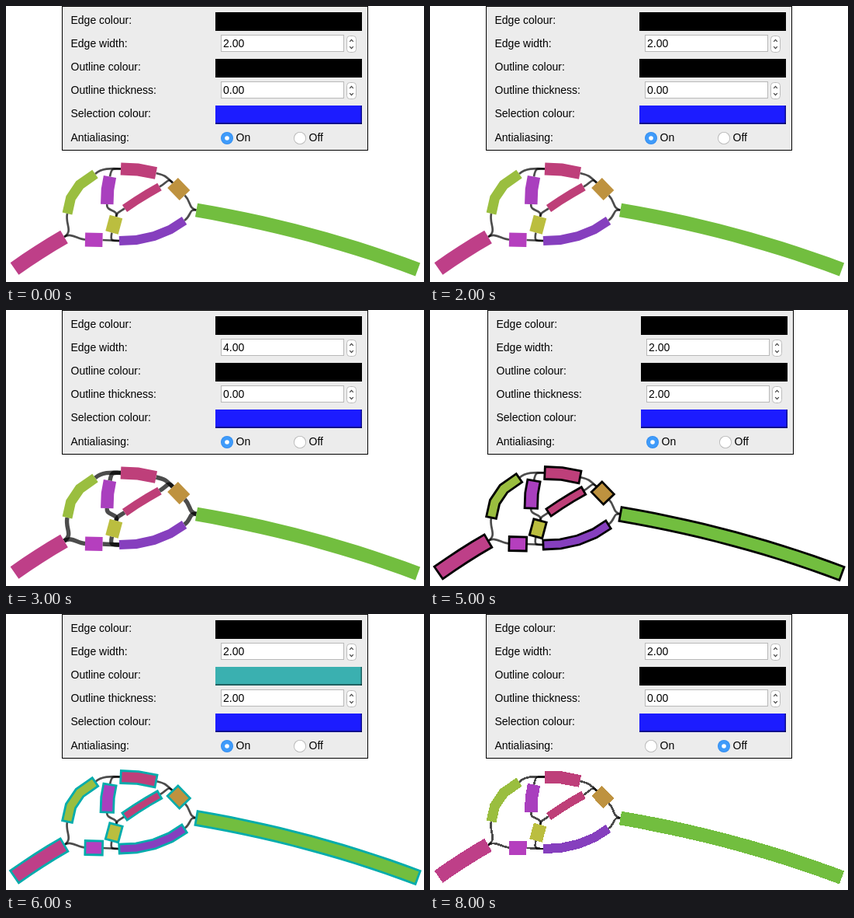
Animation of 539 by 355 pixels, one loop 9 s. Source, as an HTML page with a canvas:

```html
<!DOCTYPE html>
<html lang="en">
<head>
<meta charset="utf-8">
<title>Graph appearance settings</title>
<style>
html, body { margin: 0; width: 100%; height: 100%; overflow: hidden; background: #fff; }
canvas { display: block; width: 539px; height: 355px; }
</style>
</head>
<body>
<canvas id="stage" width="539" height="355"></canvas>
<script>
const W = 539, H = 355, STEP = 1000;
const ctx = document.getElementById('stage').getContext('2d');
const scratch = document.createElement('canvas');
scratch.width = W;
scratch.height = H;
const soft = scratch.getContext('2d', { willReadFrequently: true });

const base = { edge: '#000000', width: 2, outline: '#000000', thick: 0, smooth: true, shift: 0 };
const states = [
  {}, { edge: '#3ab0b0' },
  {}, { width: 4 },
  {}, { thick: 2, shift: 2 }, { thick: 2, outline: '#3ab0b0', line: '#00acac' },
  {}, { smooth: false }
].map(s => ({ ...base, ...s }));

// Points along a quadratic curve
function bend(a, c, b, n) {
  return Array.from({ length: n + 1 }, (_, i) => {
    const t = i / n, u = 1 - t;
    return [0, 1].map(k => u * u * a[k] + 2 * u * t * c[k] + t * t * b[k]);
  });
}

const nodes = [
  { fill: '#be3f88', w: 19, pts: bend([11, 338], [42, 316], [75, 297], 4) },
  { fill: '#9abe3f', w: 13, pts: [[79, 267], [83.5, 247], [95, 230], [115, 216]] },
  { fill: '#be3f7a', w: 16, pts: [[148, 209.5], [170, 210.5], [193.5, 215]] },
  { fill: '#a93fbe', w: 16.5, pts: [[134, 219.5], [131, 236], [130.3, 255]] },
  { fill: '#be3f78', w: 11, pts: bend([153, 260.5], [175, 245], [198, 232.5], 3) },
  { fill: '#be923f', w: 19, pts: [[215, 227.5], [230.5, 243.5]] },
  { fill: '#bbbe3f', w: 17, pts: [[142, 271], [136.5, 291.5]] },
  { fill: '#b53fbe', w: 18, pts: [[102, 300.5], [124.5, 301]] },
  { fill: '#863fbe', w: 12, pts: [[146, 302], [168, 301], [191, 296], [212, 287.5], [230, 276]] },
  { fill: '#72be3f', w: 18, pts: bend([245.5, 262.5], [395, 288], [531, 339], 14) }
];

const edges = [
  'M75 297C87 289 76 281 79 267',
  'M75 297C84 291 92 300 102 300.5',
  'M115 216C124 208 136 209 148 209.5',
  'M134 219.5C136 208 138 209 148 209.5',
  'M193.5 215C206 218 206 219 215 227.5',
  'M198 232.5C208 227 209 220 215 227.5',
  'M130.3 255C129 265 145 261 142 271',
  'M153 260.5C144 266 144 265 142 271',
  'M136.5 291.5C134 303 137 302 146 302',
  'M124.5 301C132 301 139 302 146 302',
  'M230.5 243.5C239 252 235 260 245.5 262.5',
  'M230 276C240 269 235 261 245.5 262.5'
].map(d => new Path2D(d));

// Outline of a thick polyline with flat ends and mitred joints
function ribbon({ pts, w }) {
  const normals = pts.slice(1).map((p, i) => {
    const dx = p[0] - pts[i][0], dy = p[1] - pts[i][1], len = Math.hypot(dx, dy);
    return [-dy / len, dx / len];
  });
  const side = sign => pts.map((p, i) => {
    const a = normals[Math.max(0, i - 1)];
    const b = normals[Math.min(normals.length - 1, i)];
    const k = sign * w / 2 / (1 + a[0] * b[0] + a[1] * b[1]);
    return [p[0] + (a[0] + b[0]) * k, p[1] + (a[1] + b[1]) * k];
  });
  const path = new Path2D();
  [...side(1), ...side(-1).reverse()].forEach(p => path.lineTo(p[0], p[1]));
  path.closePath();
  return path;
}
nodes.forEach(n => { n.path = ribbon(n); });

// Paints one part; without smoothing its coverage is cut to whole pixels
function paint(smooth, alpha, draw) {
  if (smooth) {
    ctx.save();
    ctx.globalAlpha = alpha;
    draw(ctx);
    ctx.restore();
    return;
  }
  soft.clearRect(0, 0, W, H);
  draw(soft);
  const img = soft.getImageData(0, 0, W, H), d = img.data;
  for (let i = 3; i < d.length; i += 4) d[i] = d[i] > 127 ? 255 : 0;
  soft.putImageData(img, 0, 0);
  ctx.globalAlpha = alpha;
  ctx.drawImage(scratch, 0, 0);
  ctx.globalAlpha = 1;
}

function drawGraph(s) {
  for (const path of edges) {
    paint(s.smooth, 0.7, c => {
      c.strokeStyle = s.edge;
      c.lineWidth = s.width * 1.35;
      c.stroke(path);
    });
  }
  for (const n of nodes) {
    paint(s.smooth, 1, c => {
      c.fillStyle = n.fill;
      c.fill(n.path);
      if (!s.thick) return;
      c.strokeStyle = s.line || s.outline;
      c.lineWidth = s.thick * 1.4;
      c.stroke(n.path);
    });
  }
}

function rect(x, y, w, h, fill) {
  ctx.fillStyle = fill;
  ctx.fillRect(x, y, w, h);
}

function text(str, x, y) {
  ctx.fillStyle = '#000';
  ctx.fillText(str, x, y);
}

function swatch(y, color) {
  rect(270, y, 189, 24, color);
  rect(270, y + 22, 189, 2, 'rgba(0,0,0,.45)');
  rect(457.5, y, 1.5, 24, 'rgba(0,0,0,.45)');
}

function spin(y, value) {
  rect(277, y, 159, 22, '#b9b9b9');
  rect(278, y + 1, 157, 20, '#fff');
  text(value.toFixed(2), 280, y + 16);
  ctx.beginPath();
  ctx.roundRect(439.5, y + 1.5, 12, 21, 4);
  ctx.fillStyle = '#fff';
  ctx.fill();
  ctx.strokeStyle = '#bdbdbd';
  ctx.lineWidth = 1;
  ctx.stroke();
  ctx.beginPath();
  for (const dir of [-1, 1]) {
    const m = y + 12 + dir * 4;
    ctx.moveTo(443.2, m - dir * 0.8);
    ctx.lineTo(445.5, m + dir * 1.6);
    ctx.lineTo(447.8, m - dir * 0.8);
  }
  ctx.strokeStyle = '#404040';
  ctx.lineWidth = 1.2;
  ctx.stroke();
}

function disc(x, y, r, fill) {
  ctx.beginPath();
  ctx.arc(x, y, r, 0, 2 * Math.PI);
  ctx.fillStyle = fill;
  ctx.fill();
}

function radio(x, label, on) {
  disc(x, 170, 8, on ? '#2f8bef' : '#b4b4b4');
  disc(x, 170, 7.2, on ? '#3f9bfa' : '#fff');
  if (on) disc(x, 170, 2.8, '#fff');
  text(label, x + 11.5, 174);
}

function drawPanel(s) {
  ctx.save();
  ctx.translate(s.shift, 0);
  rect(72, 0, 395, 186, '#000');
  rect(73, 1, 393, 184, '#ececec');
  ctx.font = '14px "Liberation Sans", Arial, sans-serif';
  ['Edge colour:', 'Edge width:', 'Outline colour:', 'Outline thickness:', 'Selection colour:', 'Antialiasing:']
    .forEach((label, i) => text(label, 83.5, i < 5 ? 23 + 30 * i : 174));
  swatch(8, s.edge);
  swatch(68, s.outline);
  swatch(128, '#1c1cff');
  spin(37, s.width);
  spin(97, s.thick);
  radio(285, 'On', s.smooth);
  radio(379, 'Off', !s.smooth);
  ctx.restore();
}

let shown = -1;
const start = performance.now();

function frame() {
  const i = Math.floor((performance.now() - start) / STEP) % states.length;
  if (i !== shown) {
    shown = i;
    rect(0, 0, W, H, '#fff');
    drawPanel(states[i]);
    drawGraph(states[i]);
  }
  requestAnimationFrame(frame);
}
frame();
</script>
</body>
</html>
```
